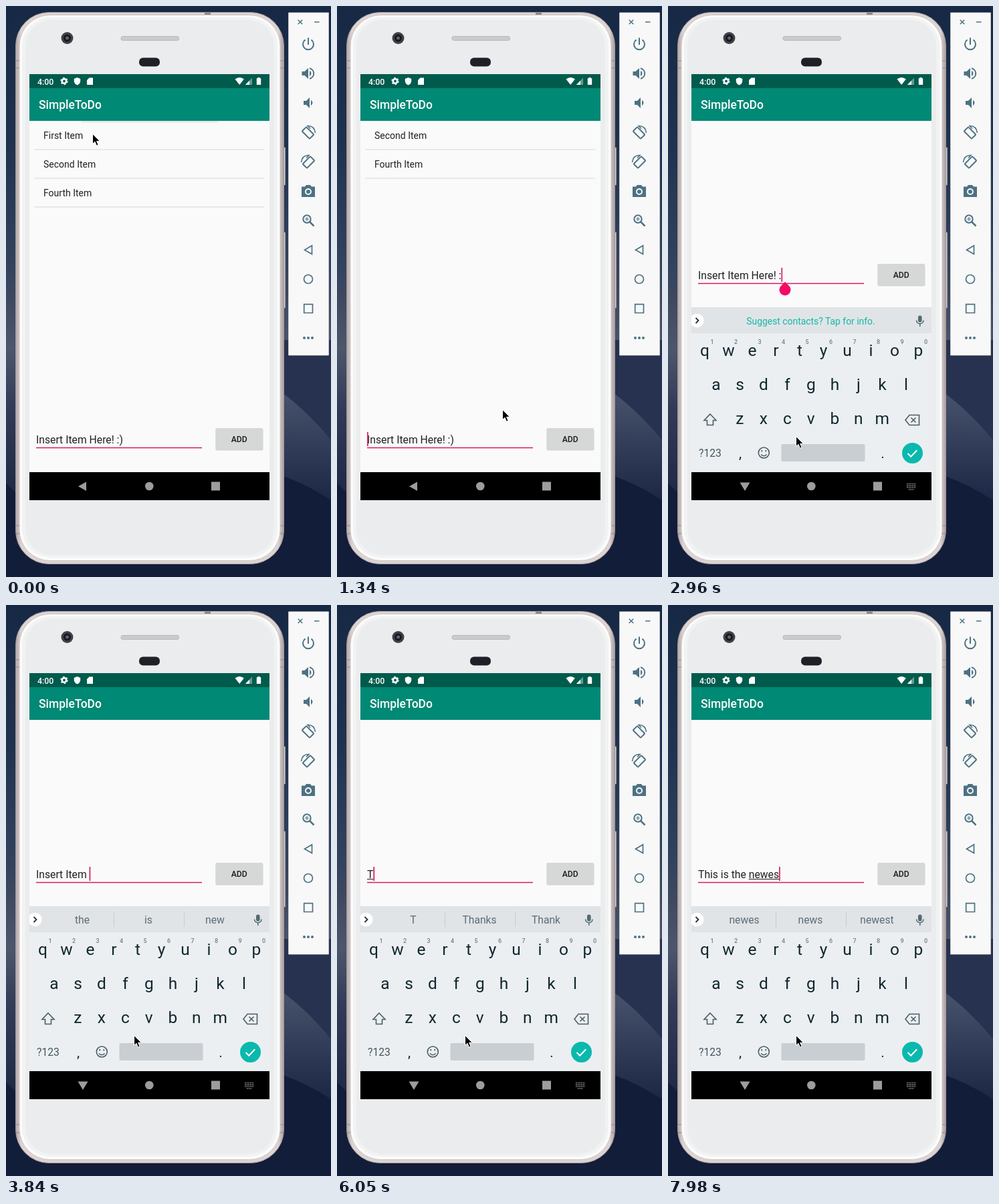
An HTML page that plays this animation: 486x855 px, repeating every 8 s.

```html
<!DOCTYPE html>
<html lang="en">
<head>
<meta charset="utf-8">
<title>SimpleToDo</title>
<style>
html, body { margin: 0; width: 100%; height: 100%; overflow: hidden; background: #14203a; }
svg { display: block; width: 486px; height: 855px; font-family: Roboto, sans-serif; }
text { white-space: pre; }
.mid { text-anchor: middle; }
.tool { fill: none; stroke: #4c7283; stroke-width: 2; }
.solid { fill: #4c7283; stroke: none; }
</style>
</head>
<body>
<svg viewBox="0 0 486 855">
  <defs>
    <linearGradient id="sky" x2="0" y2="1">
      <stop offset="0" stop-color="#162844"/><stop offset=".25" stop-color="#1f3350"/>
      <stop offset=".46" stop-color="#33435e"/><stop offset=".5" stop-color="#3c475f"/>
      <stop offset=".6" stop-color="#4c566c"/><stop offset=".7" stop-color="#323c57"/>
      <stop offset="1" stop-color="#0d1832"/>
    </linearGradient>
    <linearGradient id="dune" x2="0" y2="1">
      <stop offset="0" stop-color="#4a556f"/><stop offset="1" stop-color="#1b2744"/>
    </linearGradient>
    <linearGradient id="rim" x2="1" y2="0">
      <stop offset="0" stop-color="#b3a6a6"/><stop offset=".02" stop-color="#ddd3d2"/>
      <stop offset=".98" stop-color="#ddd3d2"/><stop offset="1" stop-color="#a99d9e"/>
    </linearGradient>
    <clipPath id="screen"><path d="M35 172h359v526H35z"/></clipPath>
    <clipPath id="keys"><path d="M35 440h359v261H35z"/></clipPath>
  </defs>

  <!-- wallpaper -->
  <path fill="url(#sky)" d="M0 0h486v855H0z"/>
  <path fill="#26324f" d="M400 500h86v355h-86z"/>
  <path fill="url(#dune)" d="M400 570Q445 600 486 650V740Q440 710 400 700z"/>
  <path fill="#121d39" d="M0 715Q30 740 60 790L400 700Q440 710 486 740V855H0z"/>

  <!-- phone -->
  <path fill="#d5cfcf" stroke="#a59b9c" stroke-width=".7" d="M412 212h5.500v56H412zM412 339h5.500v113H412z"/>
  <rect x="14.500" y="9.500" width="401" height="826" rx="50" fill="url(#rim)" stroke="#a2989a"/>
  <path stroke="#8e8688" stroke-width="1.200" d="M15 82h7M15 93h7M408 82h7M408 93h7M15 778h7M15 790h7M408 778h7M408 790h7"/>
  <path fill="#8e8688" d="M297 10h9v3h-9z"/>
  <rect x="20" y="13.500" width="390" height="817" rx="46" fill="#fbfbfb" stroke="#c5bcbc" stroke-width=".8"/>
  <rect x="24" y="17" width="382" height="809" rx="43" fill="#f1f2f2"/>
  <rect x="29" y="21" width="372" height="801" rx="39" fill="#ebeced"/>
  <circle cx="91.500" cy="48" r="9" fill="#3e4146"/>
  <circle cx="91.500" cy="48" r="5.500" fill="#17191e"/>
  <circle cx="91.500" cy="48" r="2.500" fill="#596475"/>
  <rect x="172" y="45.500" width="86.500" height="6" rx="2.500" fill="#c9cccf" stroke="#aeb1b5" stroke-width=".8"/>
  <rect x="199" y="77.500" width="31" height="13" rx="6" fill="#1f2027"/>

  <!-- app -->
  <path fill="#fafafa" d="M35 102h359v600H35z"/>
  <g clip-path="url(#screen)">
    <g id="page">
      <rect id="ripple" x="42" y="173" width="344" height="42" fill="#ddd"/>
      <g id="list"></g>
      <text id="field" x="45" y="655" font-size="15.720" fill="#212121"></text>
      <path id="under" stroke="#212121" d=""/>
      <path stroke="#d81b60" stroke-width="1.700" d="M45 661.500h248"/>
      <rect id="caret" y="638" width="1.700" height="21" fill="#d81b60"/>
      <path id="handle" fill="#f50b63" d="M0-12L6-6A8.500 8.500 0 1 1-6-6z" transform="translate(175 671)"/>
      <rect x="313.500" y="633.500" width="71" height="32" rx="2" fill="#bbb" opacity=".6"/>
      <rect x="313.500" y="632" width="70.500" height="32" rx="1.500" fill="#d6d7d7"/>
      <text class="mid" x="348.700" y="652.500" font-size="12.220" font-weight="500" fill="#1c1c1c">ADD</text>
    </g>
  </g>
  <path fill="#005b4c" d="M35 102h359v21H35z"/>
  <path fill="#008975" d="M35 123h359v49H35z"/>
  <text x="49" y="154" font-size="17.470" font-weight="500" fill="#fff">SimpleToDo</text>
  <text x="47" y="117.500" font-size="12.400" font-weight="500" fill="#fff">4:00</text>
  <g fill="#fff">
    <circle cx="87" cy="112.500" r="3.200" fill="none" stroke="#fff" stroke-width="2.600"/>
    <circle cx="87" cy="112.500" r="4.900" fill="none" stroke="#fff" stroke-width="1.500" stroke-dasharray="2.570"/>
    <path d="M106.500 107l4.700 2v4q-.7 4-4.700 5.500q-4-1.500-4.700-5.500v-4zM124.500 107.500h5.500v10.500h-9v-7z"/>
    <path d="M342.500 109.500q6.700-5 13.400 0L349.200 118zM378 107h-1.500v1.200H374.800V118h6.400V108.200H379.500V107z"/>
    <path d="M368 107.500V118H358z" opacity=".4"/><path d="M364 111.700V118H358z"/>
  </g>

  <!-- navigation bar -->
  <path d="M35 698h359v42H35z"/>
  <g fill="#9d9d9d">
    <path id="back"/>
    <circle cx="214.300" cy="719" r="6.300"/>
    <path d="M307 712.500h13v13h-13z"/>
    <path id="switch" fill="none" stroke="#8a8a8a" stroke-width="1.700" stroke-dasharray="1.700 1" d="M357 715.500h14M357 718.300h14M357 721h14M360 724h8"/>
  </g>

  <!-- keyboard -->
  <g clip-path="url(#keys)">
    <g id="board">
      <path fill="#eceff1" d="M35 451h359v247H35z"/>
      <path fill="#e0e4e7" d="M35 451h359v39H35z"/>
      <circle cx="43.300" cy="471" r="10.300" fill="#fff"/>
      <path fill="none" stroke="#263238" stroke-width="1.800" d="M41.500 467l4 4-4 4"/>
      <rect x="374" y="463.500" width="5.600" height="10" rx="2.800" fill="#546a73"/>
      <path fill="none" stroke="#546a73" stroke-width="1.500" d="M371.500 470.500a5.300 5.300 0 0 0 10.600 0M376.800 476v4"/>
      <text id="tip" class="mid" x="213.500" y="476.500" font-size="13.900" fill="#14b8a6">Suggest contacts? Tap for info.</text>
      <g id="hints" class="mid" font-size="15.700" fill="#5c6d75">
        <path stroke="#c5cbcf" d="M161.500 460v22M266.500 460v22"/>
        <text x="114" y="477"></text><text x="213" y="477"></text><text x="312.500" y="477"></text>
      </g>
      <g id="letters" class="mid" font-size="24.500" fill="#10272f"></g>
      <g fill="none" stroke="#4a5e67" stroke-width="1.600">
        <path d="M63 611l9 9.500h-4.500v7h-9v-7H54z"/>
        <path d="M361 612.500h14.500v15H361L355 620zM363.500 616.500l7 7M370.500 616.500l-7 7"/>
        <circle cx="143.300" cy="669" r="8"/><path d="M139 671.500q4.300 4.500 8.600 0M140.300 665v2.500M146.300 665v2.500"/>
      </g>
      <text class="mid" x="63" y="675" font-size="15.700" fill="#43575f">?123</text>
      <text class="mid" x="108" y="677" font-size="21" fill="#10272f">,</text>
      <text class="mid" x="321" y="677" font-size="21" fill="#10272f">.</text>
      <rect x="169.500" y="656" width="125" height="26" rx="2" fill="#c9ced2"/>
      <circle cx="365.500" cy="669.500" r="15.500" fill="#0ab9ad"/>
      <path fill="none" stroke="#fff" stroke-width="2" d="M358.500 670l4.700 4.700 9-9.500"/>
    </g>
  </g>

  <!-- emulator tools -->
  <path fill="#f8f8f8" stroke="#d9dadb" stroke-width=".7" d="M422.500 10h60v513h-60z"/>
  <g class="tool">
    <path stroke-width="1.500" d="M436.700 20.700l6.600 6.600M443.300 20.700l-6.600 6.600M461 24h7.500"/>
    <g transform="translate(452 57)"><path d="M-4.500-6.300a8 8 0 1 0 9 0M0-9.500V1"/></g>
    <g transform="translate(452 101)"><path class="solid" d="M-9.500-3h4L0-8V8l-5.500-5h-4zM2-4.200q5 4.200 0 8.400z"/><path d="M2-7.800a8 8 0 0 1 0 15.600"/></g>
    <g transform="translate(452 145)"><path class="solid" d="M-7-3h4L2-8V8l-5-5h-4zM4-4.200q5 4.200 0 8.400z"/></g>
    <g id="turn" transform="translate(452 189)">
      <rect x="-4.500" y="-8" width="9" height="16" rx="1" transform="translate(-.5 1) rotate(-45)"/>
      <path stroke-width="1.600" d="M3-5.500L-1-9.500Q9-10 10.500 1"/>
    </g>
    <use href="#turn" transform="translate(904 44) scale(-1 1)"/>
    <g transform="translate(452 277)"><path class="solid" d="M-10-6.500h5l2-2.500h6l2 2.500h5V9h-20z"/><circle cy="1" r="4" fill="#4c7283" stroke="#f8f8f8"/></g>
    <g transform="translate(452 321)"><circle cx="-2" cy="-2" r="5.700"/><path d="M2 2l6.500 6.500" stroke-width="2.500"/><path stroke-width="1.200" d="M-5-2h6M-2-5v6"/></g>
    <path stroke-width="1.700" d="M457.500 358.800v12.800L446.500 365.200z"/>
    <circle cx="452" cy="409" r="6.500" stroke-width="1.700"/>
    <path stroke-width="1.700" d="M445.700 446.700h12.800v12.800h-12.800z"/>
    <path class="solid" d="M444 497a2 2 0 1 0 4 0a2 2 0 1 0-4 0m6 0a2 2 0 1 0 4 0a2 2 0 1 0-4 0m6 0a2 2 0 1 0 4 0a2 2 0 1 0-4 0"/>
  </g>

  <path id="mouse" stroke="#fff" d="M-.5-.5v15l3.500-3.200 2.500 5.900 2.600-1.200-2.500-5.600h4.700z"/>
</svg>
<script>
const LOOP = 8000, TICK = 147.8, KEYBOARD_RISE = 246;
const PROMPT = 'Insert Item Here! :)', TYPED = 'This is the newest';
const typedLengths = [2, 4, 6, 8, 10, 12, 13, 15];
const mousePath = [[5, 130, 192], [9, 248, 605], [11, 192, 645]];
const guesses = {
  H: 'Hi|Hey', He: 'Hey|Hello', Her: 'Here|Hers', Here: "Here's|Hereby",
  I: "I'm|It", It: 'Its|Item', Ite: 'Item|Items', Item: 'Items|Itemized',
  In: 'In the|Insurance', Ins: 'Inside|Instead', Inse: 'Insert|Inside',
  Inser: 'Insert|Inserted', Insert: 'Inserts|Inserted',
  T: 'Thanks|Thank', Th: 'The|Thanks', This: 'This is|Thus', i: 'in|is',
  th: 'the|that', n: 'not|new', new: 'news|newest', newe: 'newer|newest', newes: 'news|newest'
};

const $ = id => document.getElementById(id);
const show = (id, on) => $(id).style.display = on ? '' : 'none';
const move = (id, x, y) => $(id).setAttribute('transform', `translate(${x} ${y})`);

[['qwertyuiop', 55, 523.5], ['asdfghjkl', 72, 574.5], ['zxcvbnm', 107.3, 626]].forEach(([row, x, y], r) => {
  [...row].forEach((key, i) => {
    const kx = x + 35.5 * i;
    $('letters').innerHTML += `<text x="${kx}" y="${y}">${key}</text>` +
      (r ? '' : `<text x="${kx + 11}" y="506" font-size="9" font-weight="500" fill="#6f7f87">${(i + 1) % 10}</text>`);
  });
});

function fieldText(n) {
  if (n < 20) return PROMPT;
  if (n < 41) return PROMPT.slice(0, n === 20 ? 19 : Math.max(0, 38 - n));
  if (n < 43) return 'T';
  return TYPED.slice(0, n < 51 ? typedLengths[n - 43] : n < 52 ? 15 : n < 54 ? 16 : 17);
}

function mouseAt(n) {
  const k = mousePath.findIndex(p => n <= p[0]);
  if (k < 1) return mousePath[k < 0 ? mousePath.length - 1 : 0].slice(1);
  const [a, b] = [mousePath[k - 1], mousePath[k]], f = (n - a[0]) / (b[0] - a[0]);
  return [1, 2].map(j => a[j] + (b[j] - a[j]) * f);
}

function drawList(n) {
  const items = ['Second Item', 'Fourth Item'];
  if (n < 3) items.unshift('First Item');
  $('list').innerHTML = items.map((label, i) =>
    `<text x="56" y="${199 + 43 * i}" font-size="14" fill="#212121">${label}</text>` +
    `<path stroke="#e2e2e2" stroke-width="1.700" d="M42 ${215 + 43 * i}h344"/>`).join('') +
    (n ? '' : '<path stroke="#e4e4e4" stroke-width="2" d="M112 173.500h206"/>');
  $('ripple').style.opacity = [0, .5, .8, .3][n] || 0;
}

function drawField(n) {
  const text = fieldText(n), field = $('field');
  const width = s => (field.textContent = s) ? field.getComputedTextLength() : 0;
  const word = n < 21 ? '' : text.match(/\w*$/)[0];
  const start = 45 + width(text.slice(0, text.length - word.length));
  const end = 45 + width(text);
  $('under').setAttribute('d', word ? `M${start} 656.500H${end}` : '');
  $('caret').setAttribute('x', n < 12 ? 45 : end);
  show('caret', n > 1 && (n < 6 || n > 8) && (n < 16 || n > 19));
  show('handle', n > 11 && n < 21);
  show('tip', n < 21);
  show('hints', n > 20);
  const options = word ? [word, ...(guesses[word] || 'the|and').split('|')] : text ? ['the', 'is', 'new'] : ['I', 'Thanks', "I'm"];
  $('hints').querySelectorAll('text').forEach((el, i) => el.textContent = options[i]);
}

function draw(n) {
  const raised = n > 12;
  drawList(n);
  drawField(n);
  move('page', 0, raised ? -KEYBOARD_RISE : 0);
  $('back').setAttribute('d', raised ? 'M107.500 713.500h15L115 726z' : 'M120 712.500v13.500L108 719.200z');
  show('switch', raised);
  show('board', n > 13);
  move('board', 0, n === 14 ? 3 : 0);
  $('board').style.opacity = n === 14 ? .9 : 1;
  move('mouse', ...mouseAt(n));
}

let last = -1;
function loop() {
  const n = Math.floor((performance.now() % LOOP + 12) / TICK);
  if (n !== last) draw(last = n);
  requestAnimationFrame(loop);
}
loop();
</script>
</body>
</html>
```
